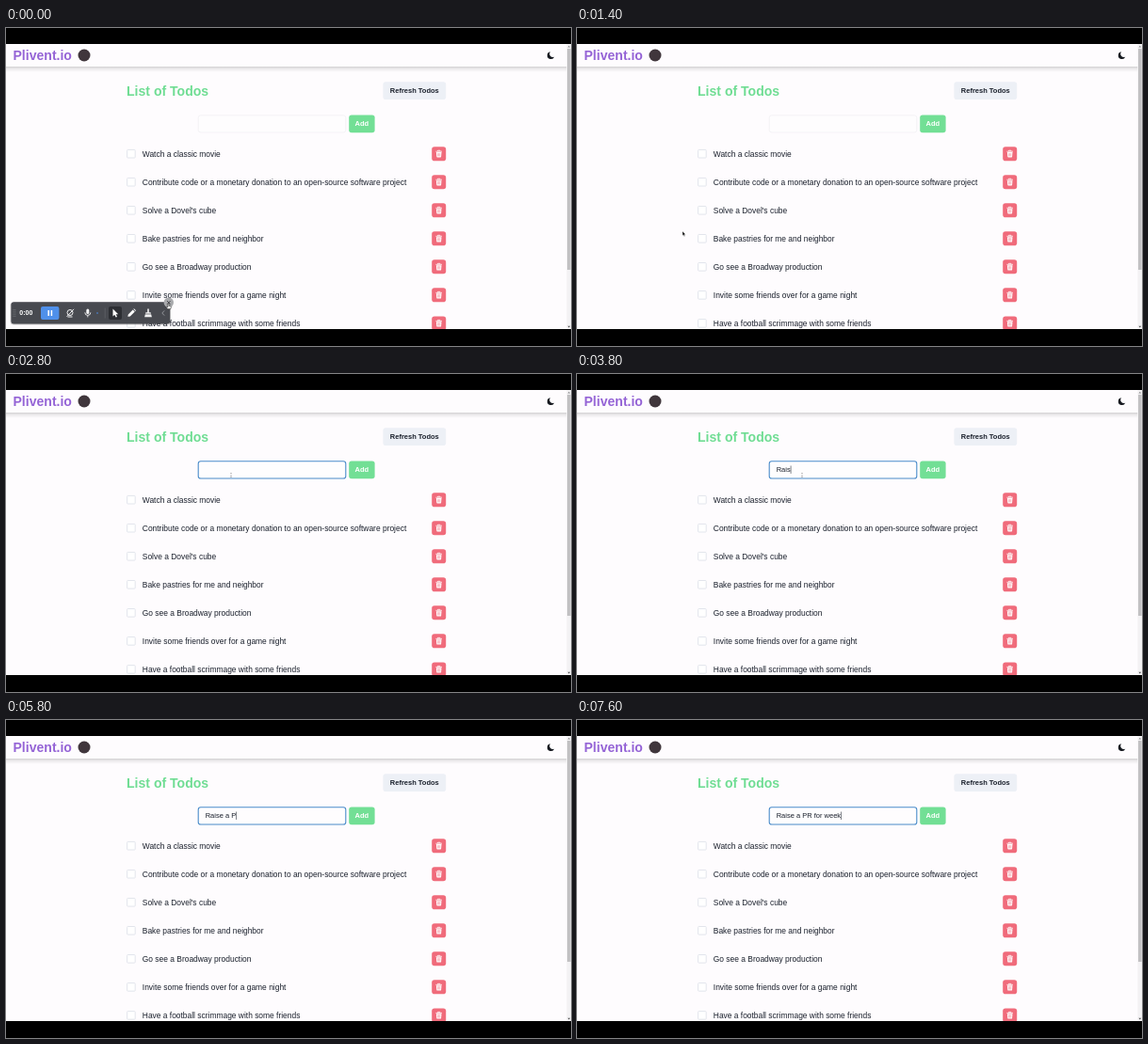
Recreate the animation shown at these times as an HTML page. Size 600 by 338 pixels, loop 8000 ms.

```html
<!DOCTYPE html>
<html lang="en">
<head>
<meta charset="utf-8">
<title>Todo list</title>
<style>
  html, body { margin: 0; width: 100%; height: 100%; overflow: hidden; background: #000; }
  svg { display: block; width: 100%; height: 100%; }
  text { font-family: "Liberation Sans", Arial, sans-serif; fill: #1a202c; white-space: pre; }
  .bold { font-weight: 700; }
  .title { font-size: 14.06px; }
  .item { font-size: 8.44px; }
  .small { font-size: 7.5px; }
</style>
</head>
<body>
<svg viewBox="0 0 600 338" preserveAspectRatio="none">
  <defs>
    <linearGradient id="shade" x1="0" y1="0" x2="0" y2="1">
      <stop offset="0" stop-color="#000" stop-opacity=".17"/>
      <stop offset=".4" stop-color="#000" stop-opacity=".07"/>
      <stop offset="1" stop-color="#000" stop-opacity="0"/>
    </linearGradient>
    <g id="trash">
      <path d="M-3.3-2.5H3.3M-1.2-2.7V-3.5H1.2V-2.7" fill="none" stroke="#fff" stroke-width=".8"/>
      <path d="M-2.8-1.6H2.8L2.4 3.1Q2.3 3.7 1.7 3.7H-1.7Q-2.3 3.7-2.4 3.1Z" fill="#fff"/>
      <path d="M-1.1-.6V2.6M0-.6V2.6M1.1-.6V2.6" stroke="#f06b7b" stroke-width=".45"/>
    </g>
    <path id="pointer" d="M0 0V4.7L1.1 3.7L1.9 5.4L2.7 5L1.9 3.4H3.4Z"/>
  </defs>

  <rect y="17" width="600" height="303" fill="#fefcfe"/>
  <rect y="41" width="595.5" height="6" fill="url(#shade)"/>
  <text class="bold title" x="7.5" y="34" style="fill:#9564d6">Plivent.io</text>
  <circle cx="83" cy="29" r="6.5" fill="#40363c"/>
  <path d="M578.2 25.3A3.9 3.9 0 1 0 582.3 30.6A3.4 3.4 0 0 1 578.2 25.3Z" fill="#15181f"/>

  <text class="bold title" x="128" y="71.5" style="fill:#6fdd93">List of Todos</text>
  <rect x="400.4" y="57.2" width="66.8" height="18.8" rx="2.8" fill="#edf0f6"/>
  <text class="bold small" x="433.8" y="69.3" text-anchor="middle">Refresh Todos</text>
  <rect id="field" x="204.2" y="92.8" width="156.6" height="18.2" rx="2.6" fill="#fefdfe"/>
  <text id="typed" class="small" x="211.7" y="104.3"></text>
  <rect id="caret" y="97.5" width=".7" height="8.4" fill="#4a4f58"/>
  <rect x="364.2" y="92.5" width="27.4" height="18.8" rx="2.8" fill="#72df95"/>
  <text class="bold small" x="377.9" y="104.4" text-anchor="middle" style="fill:#fff">Add</text>
  <g id="rows"></g>

  <rect x="595.4" y="17" width="4.6" height="303" fill="#f3f2f4"/>
  <rect x="596" y="22" width="3.6" height="235" fill="#c2c1c3"/>
  <path d="M596.4 20.4L597.8 18.8L599.2 20.4Z" fill="#8a8a8c"/>
  <path d="M596.4 316.8L597.8 318.4L599.2 316.8Z" fill="#505052"/>
  <path d="M0 0H600V17H0ZM0 320H600V338H0Z"/>

  <g id="recorder">
    <rect x="4.6" y="291.4" width="170.4" height="24.2" rx="3.6" fill="#000" opacity=".2"/>
    <rect x="5.4" y="291.2" width="168.8" height="23.4" rx="3" fill="#484a50"/>
    <path d="M8 299V307M9.8 299V307" stroke="#85878c" stroke-width=".8" stroke-dasharray=".8 1"/>
    <text class="bold" x="14.3" y="305.4" style="fill:#fff;font-size:7px">0:00</text>
    <rect x="37" y="296" width="19.4" height="14" rx="2" fill="#4f90ea"/>
    <path d="M45.2 300V306M48.4 300V306" stroke="#fff" stroke-width="1.5"/>
    <g fill="none" stroke="#f2f2f3">
      <circle cx="68" cy="302.5" r="3"/>
      <path d="M64.6 306.8L72 298.8M65.5 307H70.5"/>
      <path d="M83.8 302.4A3 3 0 0 0 89.8 302.4M86.8 305.4V307.4" stroke-width=".9"/>
    </g>
    <rect x="85.3" y="298.4" width="3" height="5.6" rx="1.5" fill="#f2f2f3"/>
    <circle cx="97" cy="303" r=".8" fill="#4f90ea"/>
    <path d="M105.2 297.5V308.5" stroke="#6a6c71" stroke-width=".6"/>
    <rect x="109" y="296" width="14" height="14" rx="2" fill="#2c2e33"/>
    <path d="M113.5 298.6V306.4L115.3 304.8L116.7 307.6L118 307L116.7 304.2H119.2Z" fill="#fff"/>
    <path d="M129.3 306.8L129.8 304.4L134.7 299.4L136.8 301.5L131.8 306.4ZM135.3 298.8L136 298.2L138 300.2L137.4 300.9Z" fill="#fff"/>
    <path d="M150.2 298.4H151.8V302.2H153.6L154.9 307.2H147.1L148.4 302.2H150.2Z" fill="#f2f2f3"/>
    <path d="M147.8 304H154.2" stroke="#484a50" stroke-width=".7"/>
    <path d="M168.2 300.4L165.8 303L168.2 305.6" fill="none" stroke="#a4a6aa" stroke-width=".8"/>
    <circle cx="172.8" cy="291.8" r="5.2" fill="#a9aaad"/>
    <path d="M171 290L174.6 293.6M174.6 290L171 293.6" stroke="#3b3d42" stroke-width=".9"/>
  </g>

  <g id="cursor">
    <use href="#pointer" id="arrow" fill="#000" stroke="#fff" stroke-width=".4"/>
    <path id="hand" d="M-.6-2.6Q0-3.2.5-2.6V-.6L2.1-.2Q2.8 0 2.7.8L2.2 2.9H-1L-2.5.6Q-2.3-.1-1.6.2L-.6.9Z" fill="#fff" stroke="#222" stroke-width=".6"/>
    <path id="beam" d="M0-2V-1M0 .2V.8M-.7 2.2H.7" stroke="#4c4c50" stroke-width=".7"/>
  </g>
</svg>
<script>
const LOOP = 8000;
const $ = id => document.getElementById(id);

const todos = [
  "Watch a classic movie",
  "Contribute code or a monetary donation to an open-source software project",
  "Solve a Dovel's cube",
  "Bake pastries for me and neighbor",
  "Go see a Broadway production",
  "Invite some friends over for a game night",
  "Have a football scrimmage with some friends"
];
$("rows").innerHTML = todos.map((label, i) => `
  <g transform="translate(0 ${133.7 + i * 30.03})">
    <rect x="128.6" y="-4.3" width="8.6" height="8.6" rx=".8" fill="#fff" stroke="#dfe3ea" stroke-width=".9"/>
    <text class="item" x="144.8" y="3">${label}</text>
    <rect x="452.2" y="-7.5" width="15" height="15" rx="2.8" fill="#f06b7b"/>
    <use href="#trash" x="459.7"/>
  </g>`).join("");

// time, cursor kind, x, y
const moves = [
  [0, "hand", 172.6, 295.8],
  [600, "hand", 150, 281],
  [800, "arrow", 125, 262],
  [1200, "arrow", 116, 239],
  [1400, "arrow", 112, 216],
  [1600, "arrow", 122, 192],
  [1800, "arrow", 158, 156],
  [2000, "arrow", 207, 121],
  [2200, "beam", 239, 107],
  [5200, "none", 0, 0]
];

// time, number of typed characters, caret shown
const phrase = "Raise a PR for week";
const keys = [
  [0, 0, false], [2200, 0, true], [2800, 0, false],
  [3400, 1, true], [3600, 3, true], [3800, 4, true], [4000, 5, true], [4200, 6, true],
  [4600, 6, false], [4800, 6, true], [5200, 7, true], [5400, 8, true], [5800, 9, true],
  [6200, 10, true], [6400, 11, true], [6600, 12, true], [6800, 13, true],
  [7000, 14, true], [7200, 16, true], [7400, 17, true], [7600, 19, true]
];

const latest = (list, t) => list.filter(step => step[0] <= t).pop();
const show = (id, on) => $(id).setAttribute("visibility", on ? "visible" : "hidden");

function draw(t) {
  show("recorder", t < 200);

  const [, kind, x, y] = latest(moves, t);
  $("cursor").setAttribute("transform", `translate(${x} ${y})`);
  for (const id of ["arrow", "hand", "beam"]) show(id, id === kind);

  const focused = t >= 2200;
  $("field").setAttribute("stroke", !focused ? "#f0eef2" : t < 2400 ? "#5b9bd6" : "#4a8cca");
  $("field").setAttribute("stroke-width", focused ? 1.1 : .7);

  const [, count, caretOn] = latest(keys, t);
  $("typed").textContent = phrase.slice(0, count);
  const width = count ? $("typed").getComputedTextLength() : 0;
  $("caret").setAttribute("x", 211.7 + width);
  show("caret", caretOn);
}

const start = performance.now();
function tick() {
  draw((performance.now() - start) % LOOP);
  requestAnimationFrame(tick);
}
tick();
</script>
</body>
</html>
```
